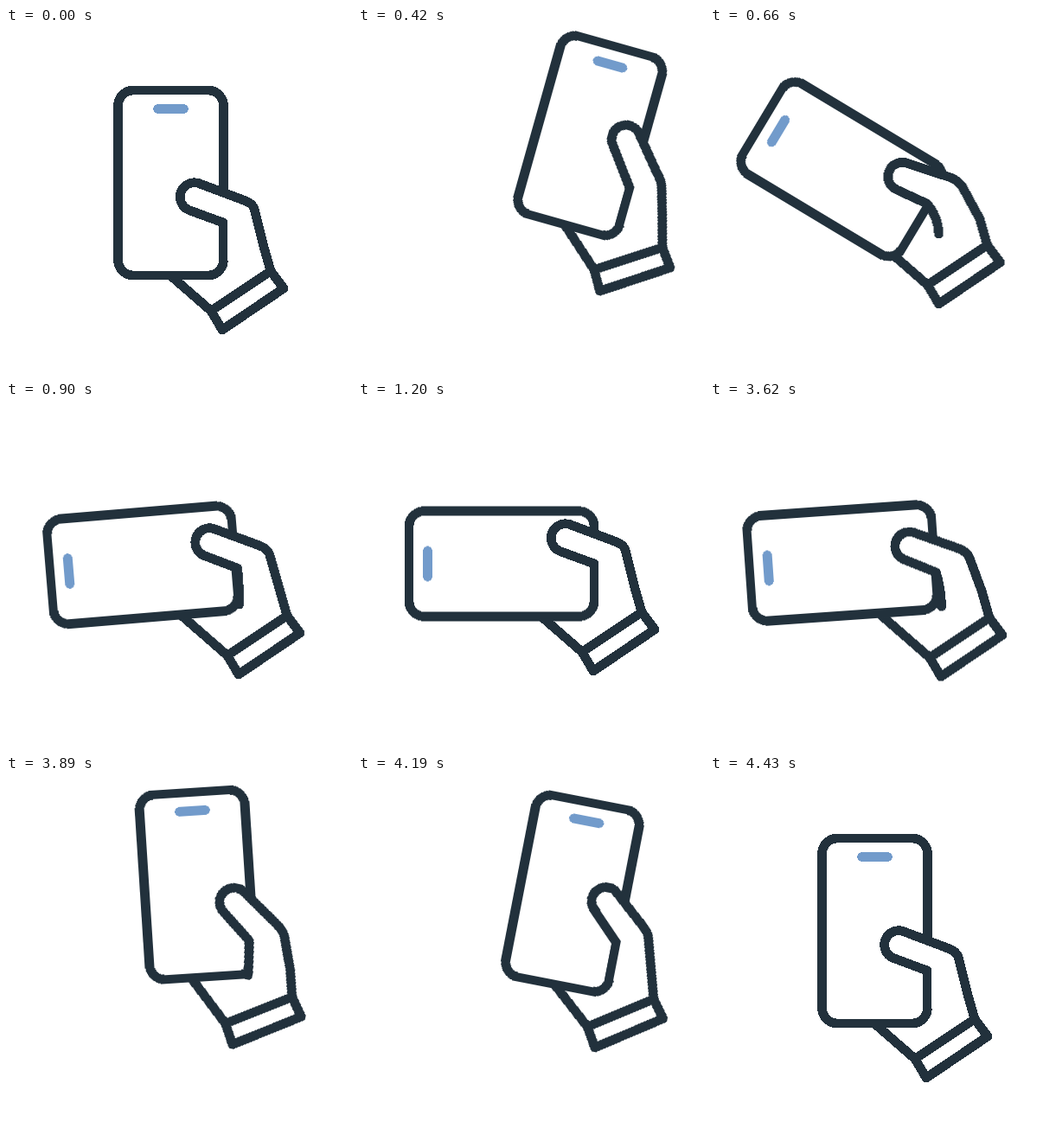
An HTML page without scripts for the animation above (5460 ms loop, 400x400 px).

```html
<!DOCTYPE html>
<html lang="en">
<head>
<meta charset="utf-8">
<title>Hand turning a phone</title>
<style>
  html, body { margin: 0; height: 100%; overflow: hidden; background: #fff; }
  svg { display: block; width: 100%; height: 100%; }

  .ink {
    fill: #fff;
    stroke: #22313c;
    stroke-width: 10.7;
    stroke-linecap: round;
    stroke-linejoin: round;
    shape-rendering: crispEdges;
  }
  .notch { stroke: #729bcb; }

  /* One pass turns the phone; the alternate pass turns it back. */
  .hand, .phone, .thumb {
    animation: 2730ms linear -502ms infinite alternate both;
  }
  .hand  { animation-name: swing; transform-origin: 278px 314px; }
  .phone { animation-name: turn; transform-origin: 190.5px 179px; }
  .thumb { animation-name: grip; }

  /* Steps keep the 30 ms cadence. */
  @keyframes swing {
    0%, 18.315% { transform: translate(0, 0) rotate(0deg); animation-timing-function: steps(2); }
    20.513% { transform: translate(2px, -5px) rotate(1.5deg); animation-timing-function: steps(3); }
    23.81%  { transform: translate(13px, -17px) rotate(5.5deg); animation-timing-function: steps(3); }
    27.106% { transform: translate(30px, -29px) rotate(11deg); animation-timing-function: steps(3); }
    30.403% { transform: translate(42px, -36px) rotate(15deg); animation-timing-function: steps(3); }
    33.7%   { transform: translate(38px, -36px) rotate(15.7deg); animation-timing-function: steps(2); }
    35.897% { transform: translate(29px, -34.5px) rotate(15.2deg); animation-timing-function: steps(2); }
    38.095% { transform: translate(18.5px, -32px) rotate(12deg); animation-timing-function: steps(2); }
    40.293% { transform: translate(15px, -30px) rotate(5deg); animation-timing-function: steps(2); }
    42.491% { transform: translate(14.5px, -30px) rotate(0deg); animation-timing-function: steps(5); }
    47.985% { transform: translate(17px, -31.5px) rotate(0deg); animation-timing-function: steps(8); }
    56.777%, 100% { transform: translate(22px, -38px) rotate(0deg); }
  }

  @keyframes turn {
    0%, 33.7% { transform: translate(0, 0) rotate(0deg); animation-timing-function: steps(2); }
    35.897% { transform: translate(-9.5px, -1px) rotate(-3deg); animation-timing-function: steps(2); }
    38.095% { transform: translate(-18.9px, -2.2px) rotate(-15.7deg); animation-timing-function: steps(2); }
    40.293% { transform: translate(-37px, 0) rotate(-35deg); animation-timing-function: steps(1); }
    41.392% { transform: translate(-47px, 4.5px) rotate(-47deg); animation-timing-function: steps(1); }
    42.491% { transform: translate(-52.7px, 14.2px) rotate(-59deg); animation-timing-function: steps(2); }
    44.689% { transform: translate(-58px, 27px) rotate(-81deg); animation-timing-function: steps(3); }
    47.985% { transform: translate(-55px, 38.5px) rotate(-94deg); animation-timing-function: steps(4); }
    52.381% { transform: translate(-50.5px, 45px) rotate(-95deg); animation-timing-function: steps(4); }
    56.777% { transform: translate(-47.7px, 46px) rotate(-92.3deg); animation-timing-function: steps(3); }
    60.073% { transform: translate(-46.6px, 46px) rotate(-90.6deg); animation-timing-function: steps(2); }
    62.271%, 100% { transform: translate(-46.5px, 46px) rotate(-90deg); }
  }

  @keyframes grip {
    0%, 18.315% {
      d: path("M306 281L297.5 251L287 209Q285 203 276 199.5L222.6 179.5A16.5 16.5 0 0 0 211.4 210.5L251 225Q251 247 251 268");
      animation-timing-function: ease-in-out;
    }
    33.7% {
      d: path("M306 281L297.5 251L286 213Q284 207 276 199L244 161A16.5 16.5 0 0 0 219.3 183L251 225Q251 247 251 268");
      animation-timing-function: steps(4);
    }
    38.095% {
      d: path("M306 281L297.5 251L283 215Q280 208 269 201L226.4 173.7A16.5 16.5 0 0 0 208.4 201.5L244 227.5Q248 247 251 267");
      animation-timing-function: steps(4);
    }
    42.491% {
      d: path("M306 281L297.5 251L277.5 214Q273 207 264 203L212.6 186A16.5 16.5 0 0 0 201.4 217L236 233Q249 247 250 268");
      animation-timing-function: ease-in-out;
    }
    54.579%, 100% {
      d: path("M306 281L297.5 251L287 209Q285 203 276 199.5L222.6 179.5A16.5 16.5 0 0 0 211.4 210.5L251 225Q251 247 251 268");
    }
  }
</style>
</head>
<body>
<svg viewBox="0 0 400 400">
  <g class="hand ink">
    <path d="M182 279L237 327"/>
    <g class="phone">
      <rect x="129.5" y="72" width="122" height="214" rx="18"/>
      <path class="notch" d="M175.5 93.5H205.5"/>
    </g>
    <path class="thumb" d="M306 281L297.5 251L287 209Q285 203 276 199.5L222.6 179.5A16.5 16.5 0 0 0 211.4 210.5L251 225Q251 247 251 268"/>
    <path d="M237 327L306 281L321 301L250 349Z"/>
  </g>
</svg>
</body>
</html>
```
